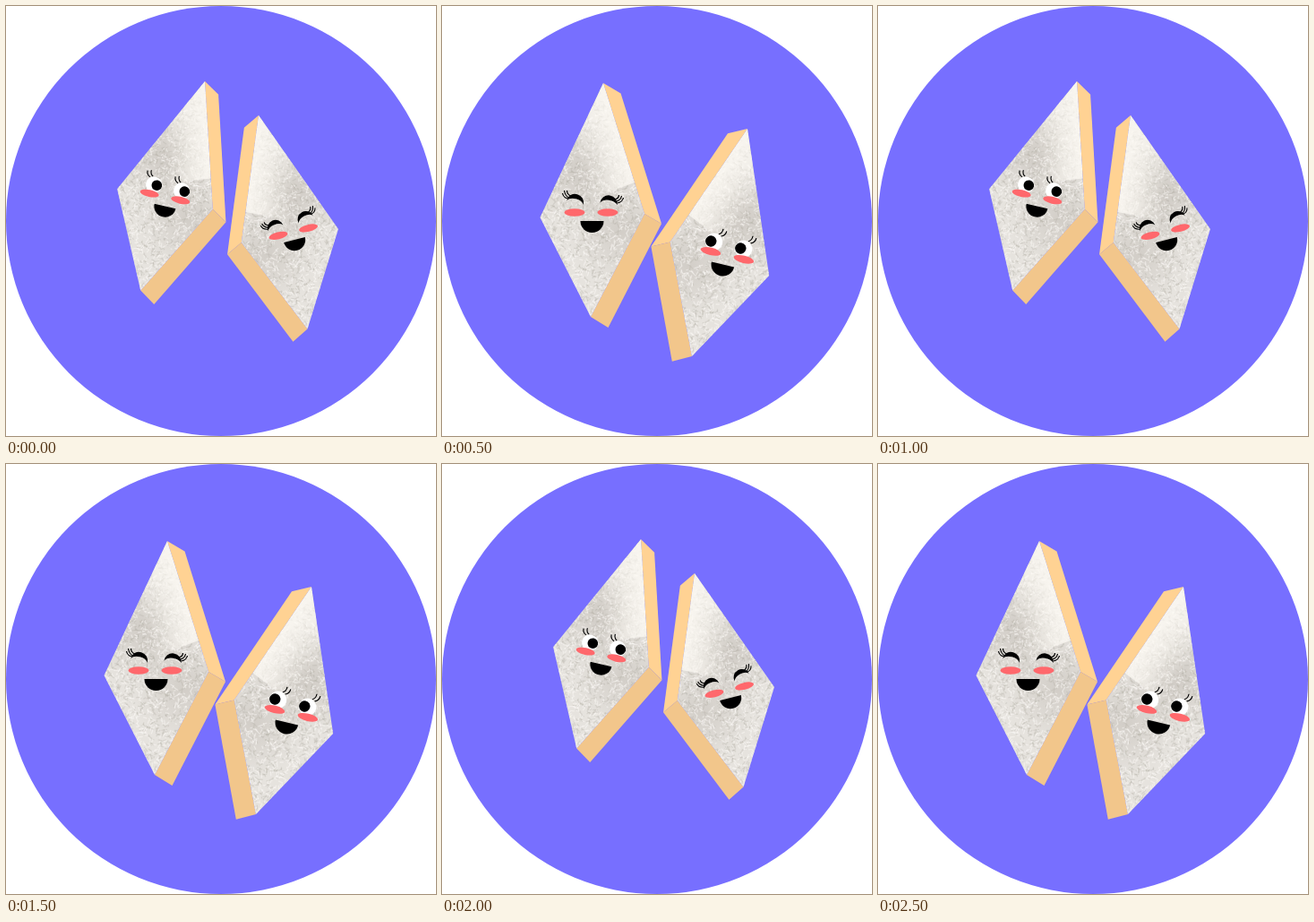
Write an HTML page with a canvas that moves like this. It is 480 by 480 pixels and loops after 3 s.

```html
<!DOCTYPE html>
<html>
<head>
<meta charset="utf-8">
<style>
  html, body { margin: 0; width: 100%; height: 100%; overflow: hidden; background: #fff; }
  canvas { display: block; }
</style>
</head>
<body>
<canvas id="stage" width="480" height="480"></canvas>
<script>
const ctx = document.getElementById('stage').getContext('2d');
const STEP = 500;

// One bread slice, measured from its top corner.
const bread = new Path2D('M0 0L46 146L-14 261L-70.5 150Z');
const sideCrust = new Path2D('M0 0L19.5 11.5L65 157L46 146Z');
const baseCrust = new Path2D('M46 146L65 157L5.5 273L-14 261Z');

// Faces are measured from the middle of the upper lip.
const mouth = new Path2D('M-13 0H13A13 13 0 0 1-13 0Z');
const closedLid = new Path2D('M-9.7 0A9.7 9.7 0 0 1 9.7 0A10.5 7 0 0 0-9.7 0Z');
const closedLashes = new Path2D(
  'M-27-25Q-32-26-33-31M-26-26Q-30-28-31-34M-24-28Q-28-30-28-34' +
  'M28-20Q34-21 35-26M27-22Q32-23 33-28M25-24Q30-25 30-29');
const openLashes = new Path2D('M-9.8-8Q-14.5-10-14.5-15M-6.6-9.5Q-10.5-11.5-10.2-16.5');

const poses = [
  [
    { slice: [222, 84, 14, 0.935], face: [177.5, 223.5, 12.5, 0.935], happy: false },
    { slice: [282, 122, -9.8, 0.936, -1], face: [322, 261, -14, 0.936, -1], happy: true }
  ],
  [
    { slice: [180, 86, 0, 1], face: [167.5, 240, 0, 1], happy: true },
    { slice: [341, 137, 16.8, 1, -1], face: [313.5, 288.5, 13.5, 1, -1], happy: false }
  ]
];

function placed([x, y, degrees, scale, flip = 1], draw) {
  ctx.save();
  ctx.translate(x, y);
  ctx.rotate(degrees * Math.PI / 180);
  ctx.scale(scale * flip, scale);
  draw();
  ctx.restore();
}

function fill(color, path) {
  ctx.fillStyle = color;
  ctx.fill(path);
}

function ellipse(color, x, y, rx, ry = rx) {
  const path = new Path2D();
  path.ellipse(x, y, rx, ry, 0, 0, Math.PI * 2);
  fill(color, path);
}

function seeded(seed) {
  return () => (seed = seed * 16807 % 2147483647) / 2147483647;
}

function shade(x, y, radius, color, alpha) {
  const glow = ctx.createRadialGradient(x, y, 0, x, y, radius);
  glow.addColorStop(0, `rgba(${color},${alpha})`);
  glow.addColorStop(1, `rgba(${color},0)`);
  fill(glow, bread);
}

function drawSlice() {
  fill('#ffd293', sideCrust);
  fill('#f2c68b', baseCrust);
  fill('#e6e3de', bread);
  ctx.save();
  ctx.clip(bread);
  shade(-22, 100, 62, '188,182,175', 0.55);
  shade(20, 165, 60, '190,184,177', 0.5);

  // Crumb: short flecks in random directions.
  const random = seeded(71);
  ctx.lineWidth = 1.3;
  for (let i = 0; i < 3000; i++) {
    const x = random() * 118 - 71, y = random() * 262;
    const angle = random() * Math.PI, length = 2 + random() * 4;
    ctx.strokeStyle = random() < 0.5 ? 'rgba(255,253,250,.42)' : 'rgba(177,171,164,.3)';
    ctx.beginPath();
    ctx.moveTo(x, y);
    ctx.lineTo(x + Math.cos(angle) * length, y + Math.sin(angle) * length);
    ctx.stroke();
  }

  const light = ctx.createLinearGradient(23, 73, -27, 89);
  light.addColorStop(0, 'rgba(253,250,244,.95)');
  light.addColorStop(0.4, 'rgba(253,250,244,.65)');
  light.addColorStop(1, 'rgba(253,250,244,0)');
  ctx.fillStyle = light;
  ctx.globalAlpha = 0.85;
  ctx.fill(new Path2D('M0 0L35 111L-30 135L-60 128Z'));
  ctx.restore();
}

function drawFace(happy) {
  ctx.lineWidth = 1.2;
  ctx.strokeStyle = '#000';
  if (happy) {
    placed([-19, -20.5, 15, 1], () => fill('#000', closedLid));
    placed([18.5, -19, 8, 1], () => fill('#000', closedLid));
    ctx.stroke(closedLashes);
  } else {
    for (const x of [-15, 19]) {
      placed([x, -22.2, 0, 1], () => {
        ellipse('#fff', -3.5, 0, 9.7);
        ellipse('#000', 0, 0, 6.2);
        ctx.stroke(openLashes);
      });
    }
  }
  const [left, right, y] = happy ? [-19.5, 17.5, -9.5] : [-21.4, 16.5, -11];
  ellipse('#ff686c', left, y, 11.5, 4.2);
  ellipse('#ff686c', right, y, 11.5, 4.2);
  fill('#000', mouth);
}

function draw(pose) {
  ctx.clearRect(0, 0, 480, 480);
  ellipse('#776fff', 240, 240, 240);
  for (const { slice, face, happy } of pose) {
    placed(slice, drawSlice);
    placed(face, () => drawFace(happy));
  }
}

let shown = -1;
function tick() {
  const index = Math.floor(performance.now() / STEP) % poses.length;
  if (index !== shown) draw(poses[shown = index]);
  requestAnimationFrame(tick);
}
tick();
</script>
</body>
</html>
```
